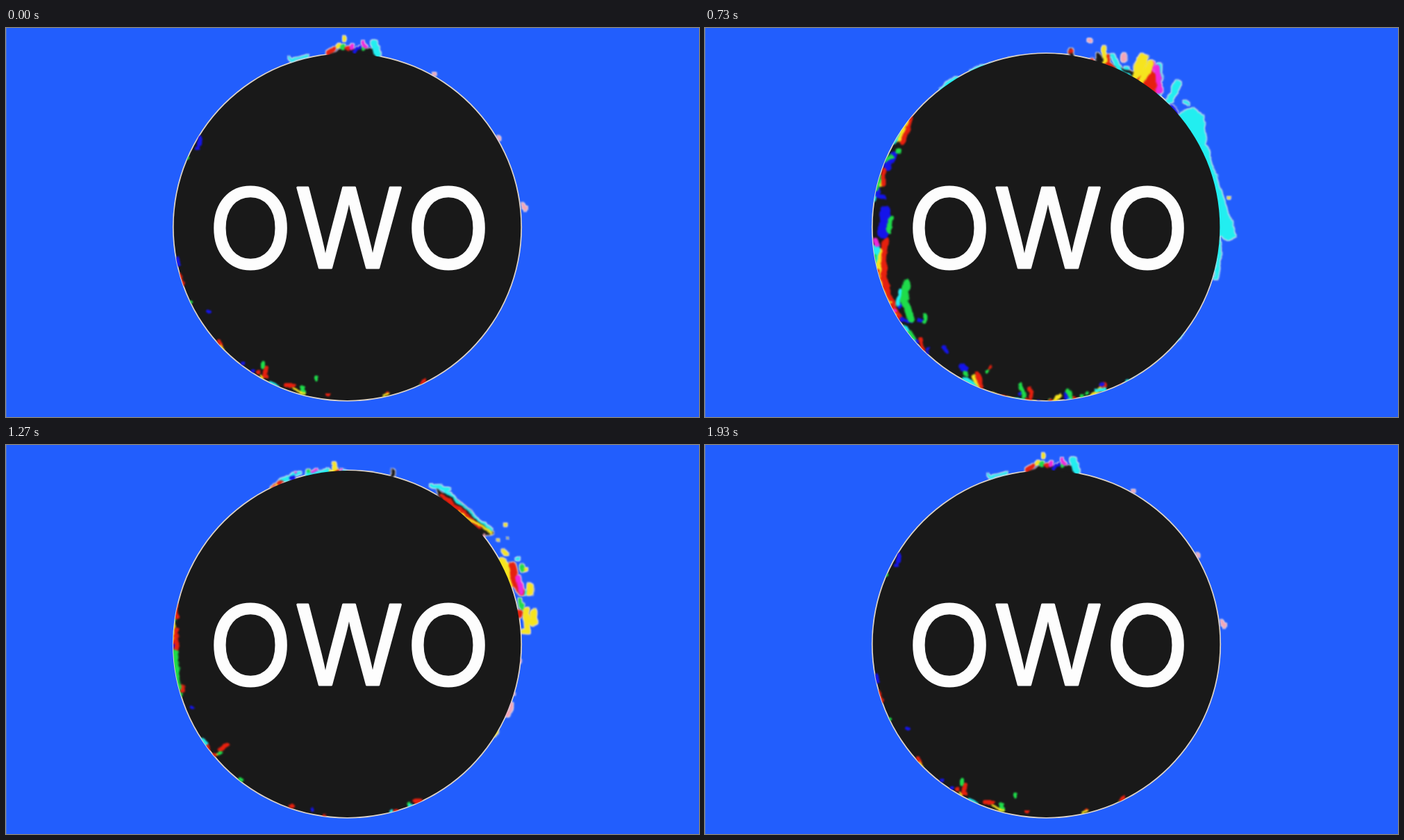
Write an HTML page without scripts that moves like this. It is 998 by 561 pixels and loops after 1.99 s.

```html
<!DOCTYPE html>
<html lang="en">
<head>
<meta charset="utf-8">
<title>OWO</title>
<style>
html, body { margin: 0; width: 100%; height: 100%; overflow: hidden; background: #225efd; }
svg { display: block; width: 100vw; height: 100vh; }
text { font: 159px Inter, "Open Sans", sans-serif; text-anchor: middle; fill: #fdfdfd; stroke: #fdfdfd; stroke-width: 3; stroke-linejoin: round; }
path { fill: none; stroke: currentColor; stroke-width: 6; stroke-linecap: round; stroke-linejoin: round; }
.solid { fill: currentColor; stroke-width: 2; }
.thin { stroke-width: 3.5; }
.mid { stroke-width: 10; }
.fat { stroke-width: 15; }
.c { color: #22eef0; } .y { color: #f6e41e; } .r { color: #e6200e; } .m { color: #ee28dc; }
.g { color: #1fdc4a; } .b { color: #1414ea; } .k { color: #191919; } .p { color: #f5a2b4; }

/* Flares sink under the disc, inner marks slide out past its edge. */
.outer { --s: .95; }
.inner { --s: 1.05; }
.outer g, .inner g { transform-origin: 491.5px 287px; animation: 1.99s infinite; }
.outer .p0, .inner .p0 { animation-name: p0; }
.outer .p1, .inner .p1 { animation-name: p1; }
.outer .p2, .inner .p2 { animation-name: p2; }
.outer .p3, .inner .p3 { animation-name: p3; }
.outer .p4, .inner .p4 { animation-name: p4; }
.outer .p5, .inner .p5 { animation-name: p5; }
@keyframes p0 {
  0% { visibility: visible; transform: rotate(0deg) scale(1); animation-timing-function: steps(4); }
  13.333% { visibility: hidden; transform: rotate(9deg) scale(var(--s)); animation-timing-function: step-end; }
  80% { visibility: hidden; transform: rotate(-9deg) scale(var(--s)); animation-timing-function: steps(5); }
  96.667%, 100% { visibility: visible; transform: rotate(0deg) scale(1); }
}
@keyframes p1 {
  0% { visibility: hidden; transform: rotate(-9deg) scale(var(--s)); animation-timing-function: steps(4); }
  13.333% { visibility: visible; transform: rotate(0deg) scale(1); animation-timing-function: steps(5); }
  30%, 100% { visibility: hidden; transform: rotate(9deg) scale(var(--s)); }
}
@keyframes p2 {
  0%, 13.333% { visibility: hidden; transform: rotate(-9deg) scale(var(--s)); animation-timing-function: steps(5); }
  30% { visibility: visible; transform: rotate(0deg) scale(1); animation-timing-function: steps(4); }
  43.333%, 100% { visibility: hidden; transform: rotate(9deg) scale(var(--s)); }
}
@keyframes p3 {
  0%, 30% { visibility: hidden; transform: rotate(-9deg) scale(var(--s)); animation-timing-function: steps(4); }
  43.333% { visibility: visible; transform: rotate(0deg) scale(1); animation-timing-function: steps(4); }
  56.667%, 100% { visibility: hidden; transform: rotate(9deg) scale(var(--s)); }
}
@keyframes p4 {
  0%, 43.333% { visibility: hidden; transform: rotate(-9deg) scale(var(--s)); animation-timing-function: steps(4); }
  56.667% { visibility: visible; transform: rotate(0deg) scale(1); animation-timing-function: steps(7); }
  80%, 100% { visibility: hidden; transform: rotate(9deg) scale(var(--s)); }
}
@keyframes p5 {
  0%, 56.667% { visibility: hidden; transform: rotate(-9deg) scale(var(--s)); animation-timing-function: steps(7); }
  80% { visibility: visible; transform: rotate(0deg) scale(1); animation-timing-function: steps(5); }
  96.667%, 100% { visibility: hidden; transform: rotate(9deg) scale(var(--s)); }
}
</style>
</head>
<body>
<svg viewBox="0 0 998 561">
<defs>
  <clipPath id="disc"><circle cx="491.5" cy="287" r="250.6"/></clipPath>
  <filter id="soft"><feGaussianBlur stdDeviation=".6"/></filter>
  <filter id="flare" filterUnits="userSpaceOnUse" x="0" y="0" width="998" height="561" color-interpolation-filters="sRGB">
    <feTurbulence type="fractalNoise" baseFrequency=".08" numOctaves="2" seed="4"/>
    <feDisplacementMap in="SourceGraphic" scale="7" xChannelSelector="R" yChannelSelector="G"/>
    <feGaussianBlur stdDeviation=".8" result="shape"/>
    <feMorphology operator="dilate" radius="1" result="wide"/>
    <feFlood flood-color="#dcd8ea"/>
    <feComposite in2="wide" operator="in"/>
    <feMerge><feMergeNode/><feMergeNode in="shape"/></feMerge>
  </filter>
  <filter id="smear" filterUnits="userSpaceOnUse" x="0" y="0" width="998" height="561" color-interpolation-filters="sRGB">
    <feTurbulence type="fractalNoise" baseFrequency=".09" numOctaves="2" seed="9"/>
    <feDisplacementMap in="SourceGraphic" scale="7" xChannelSelector="R" yChannelSelector="G"/>
    <feGaussianBlur stdDeviation="1.2"/>
  </filter>
</defs>

<rect width="998" height="561" fill="#225efd"/>
<rect width="1" height="561" fill="#4a74d6"/>
<circle cx="491.5" cy="287" r="251.6" fill="#ded4c8" filter="url(#soft)"/>

<g class="outer" filter="url(#flare)">
  <g class="p0">
    <path class="k solid" d="M455 44 470 37 495 29 525 31 540 44z"/>
    <path class="y" d="M487 14v2M478 29l3-3"/>
    <path class="r" d="M464 36l8-5M492 29h0"/>
    <path class="g" d="M486 30v-4M516 31h0"/>
    <path class="b" d="M502 33l3-3M510 29h0"/>
    <path class="m" d="M497 27l2-1M514 20l4 7"/>
    <path class="c mid" d="M530 21l4 16"/>
    <path class="c thin" d="M407 42l4 5 24-6"/>
    <path class="p thin" d="M743 254l4 8M746 260h5M614 66h3M708 158l2 3"/>
  </g>
  <g class="p1">
    <path class="k solid" d="M488 42 505 28 530 22 575 28 586 54z"/>
    <path class="k" d="M488 24v3"/>
    <path class="y" d="M499 15l11 17M538 22l4-8M560 26l4-15"/>
    <path class="r" d="M506 13l13 19M552 26l2-10M566 28l3-16"/>
    <path class="b" d="M513 16l10 14M573 44v-32"/>
    <path class="m" d="M545 16l3-3M568 30l2-12"/>
    <path class="g" d="M531 19v8"/>
    <path class="c" d="M522 20l5 6M580 48v-38"/>
    <path class="y thin" d="M415 43l25-5M467 32h2M742 250v25"/>
    <path class="c thin" d="M625 70l8 2M650 75h0M699 142l5 6M737 210l2 14M743 212l1 10"/>
  </g>
  <g class="p2">
    <path class="k solid" d="M545 42 547 25 560 38 600 48 634 70 642 88 590 74z"/>
    <path class="p" d="M533 8h0M586 25v6"/>
    <path class="r" d="M562 41l18 5"/>
    <path class="c" d="M590 43h4"/>
    <path class="c thin" d="M680 118l6 5M702 428l-5 8"/>
    <path class="y fat" d="M614 28l-7 28"/>
    <path class="r mid" d="M610 62l12-12"/>
    <path class="m mid" d="M628 34l-6 32"/>
    <path class="b" d="M624 70l9-20M632 80l-1-14"/>
    <path class="c mid" d="M639 38l1 42"/>
    <path class="y thin" d="M757 223h1M418 43l25-5"/>
    <path class="c thin" d="M728 180h0M735 191h0M738 207h0"/>
    <path class="p thin" d="M725 382v3"/>
  </g>
  <g class="p3">
    <path class="k" d="M548 30v8"/>
    <path class="r" d="M548 32h1M603 42l-3 14M576 48h2"/>
    <path class="y" d="M597 29v22"/>
    <path class="c" d="M609 42l11 26 16 12M743 325q2 30-8 57"/>
    <path class="y mid" d="M664 58l-18 30"/>
    <path class="m mid" d="M673 66v34"/>
    <path class="r solid" d="M664 70 648 94 668 106 669 76z"/>
    <path class="c mid" d="M701 91l-13 23M355 73l21-13"/>
    <path class="b" d="M690 124l6 10"/>
    <path class="c thin" d="M711 117l4 5M400 48l30-8"/>
    <path class="c solid" d="M697 137 722 130 733 140 736 180 748 240 762 290 769 322 758 327 742 318 738 240z"/>
    <path class="y thin" d="M715 405l-9 13"/>
  </g>
  <g class="p4">
    <path class="c" d="M386 52l23-12M430 41l22-6M605 49l22 5"/>
    <path class="m thin" d="M404 40h0M429 37l7-3"/>
    <path class="r" d="M373 63l12-8"/>
    <path class="b" d="M398 48h4"/>
    <path class="y thin" d="M372 64l6-4M455 36h10M716 405l-4 6"/>
    <path class="k" d="M546 31v8"/>
    <path class="k solid" d="M612 55 640 68 697 115 680 120 620 75z"/>
    <path class="c thin" d="M625 57l35 29 34 25"/>
    <path class="r" d="M619 63l58 44"/>
    <path class="y thin" d="M645 87l50 28"/>
    <path class="y" d="M714 102h0M713 140l4 4M746 166h1M748 256h8"/>
    <path class="y thin" d="M705 125h0M718 122h0"/>
    <path class="y fat" d="M713 158l15 28"/>
    <path class="r mid" d="M727 162l6 24 9 14M740 230v4"/>
    <path class="m" d="M737 178l4 22"/>
    <path class="c" d="M734 152h1M749 198v4"/>
    <path class="g" d="M742 162v4M741 212l2 10"/>
    <path class="y mid" d="M755 190v10M750 226l4 28M762 228v14"/>
    <path class="p thin" d="M744 298v4M735 364l-5 18M738 349h0"/>
  </g>
  <g class="p5">
    <path class="c mid" d="M463 27l-3 9M515 33h2"/>
    <path class="g" d="M463 24h0M452 37h0"/>
    <path class="y" d="M502 17v18"/>
    <path class="r" d="M505 30h0"/>
    <path class="m thin" d="M512 28h0M406 47l5-5M659 98l6 6"/>
    <path class="y thin" d="M425 42l20-5M546 40h1"/>
    <path class="c thin" d="M480 34h9M682 118l2 3M641 487l3-2"/>
    <path class="p thin" d="M713 147l-4 4M738 355v3M727 383l-3 4"/>
  </g>
</g>

<circle cx="491.5" cy="287" r="249.9" fill="#191919" filter="url(#soft)"/>

<g clip-path="url(#disc)">
<g class="inner" filter="url(#smear)">
  <g class="p0">
    <path class="b" d="M279 158l-1 9M276 172h0M247 333l2 8M291 408h0M340 484h0M356 495h0"/>
    <path class="g" d="M262 188h0M265 395h0M370 483v6M428 520v6M447 505h0M597 514h0"/>
    <path class="r" d="M251 357l3 12M306 452l4 6M375 490l-2 13M364 496h0M404 516h12M463 530h0M549 527h0M598 512l6-3"/>
    <path class="y thin" d="M308 458l4 4M367 502l3 4M414 521l15 6M544 531l7-3"/>
    <path class="c thin" d="M380 511l12 5"/>
  </g>
  <g class="p1">
    <path class="r" d="M247 240l-2 20M243 284l1 16M316 454l19 14M346 472l14 5M448 520h0M468 525h0M487 521l3 12M660 470h0"/>
    <path class="y" d="M243 255v18M312 459l20 16M395 498l5-21M482 527l4 7M635 487l8-6"/>
    <path class="g" d="M258 238h0M247 312h0M260 344h0M326 473l18 9M389 502l6-23M439 512l3 12"/>
    <path class="c" d="M334 480l22 7M379 505l4-20M431 529h4M445 531l20 3M612 504l10-7"/>
    <path class="m" d="M363 492l13 10M476 532h0"/>
    <path class="b" d="M384 503l7-24M432 510l3 14"/>
  </g>
  <g class="p2">
    <path class="r mid" d="M289 142l-9 40M268 325q-8 60 28 106M590 503l-6 14"/>
    <path class="y mid" d="M281 154l-8 26M260 340q-6 56 30 92"/>
    <path class="y" d="M249 230l5 16M406 504l8 16M420 526l55 9M529 521l-6 10M575 520l10-12"/>
    <path class="c mid" d="M268 182l3-10M245 268l2-24M255 336l-1 26M302 446l14 14M396 511l12 9M488 537h6"/>
    <path class="b mid" d="M262 220l8-18M389 492l5 4"/>
    <path class="b fat" d="M264 282l-1 32"/>
    <path class="b" d="M252 262v-8M325 432h0M362 468l4 4M338 470h0M500 534h0M322 462h0"/>
    <path class="g" d="M276 194v4M260 212l6-7M253 236l-4 18M272 292v18M331 425v7M312 450l6 8M395 502h0M425 495h0M515 530h0M560 521h0"/>
    <path class="r" d="M257 224l2 20M411 500l8 19M428 490h0M538 521l14 5M440 529l12 2M484 533h10"/>
    <path class="m" d="M253 326l4 4M462 534h0"/>
  </g>
  <g class="p3">
    <path class="b" d="M262 226l6 2M278 381h0M274 400l18 5M310 451h0M436 518h0M500 522l2 10M553 514h0"/>
    <path class="g mid" d="M290 350l-6 25 9 27"/>
    <path class="g" d="M247 308v12M284 421h0M438 505l4 18M455 530h0M503 519l4 13M530 525h0M610 505h4M400 518h0"/>
    <path class="r" d="M263 182h0M250 330v14M262 362l8 18M276 394l-4 8M303 431l2 19M450 512l2 18M478 531h0M573 523l6-5"/>
    <path class="c" d="M243 315h0M280 362l-5 16M275 411l19 28M430 525l10 4M505 533h0M544 522h11M590 514l20-8"/>
    <path class="y thin" d="M265 375h0M298 442h0M565 525h0M625 496l10-6"/>
    <path class="m" d="M270 386h0"/>
  </g>
  <g class="p4">
    <path class="r mid" d="M247 298l2 4M600 506h4"/>
    <path class="r" d="M300 446h0M328 437l-10 8M470 534h0M572 522h0"/>
    <path class="g" d="M245 263h0M250 309h0M250 350h0M318 450h0M348 487h0M590 512h0"/>
    <path class="c" d="M245 318h2M290 432l7 7M480 537h3M566 523h0M592 515h2"/>
    <path class="b" d="M248 335h0M275 387h0M452 524h0"/>
    <path class="y thin" d="M243 306h0M314 452h0M605 510h0"/>
    <path class="m thin" d="M245 292h0"/>
  </g>
  <g class="p5">
    <path class="r" d="M261 194l-1 30M258 240l-4 15M256 320v6M281 408h0M290 420h0M326 473h0M390 503h0"/>
    <path class="y mid" d="M254 204l-6 50"/>
    <path class="g mid" d="M250 270v54"/>
    <path class="c" d="M243 266v52M286 425h0M338 482l8 7M640 487l-8 6"/>
    <path class="g" d="M254 332h0M276 404h0M295 440h0"/>
    <path class="b" d="M250 262h0M270 396h0M249 338h0"/>
    <path class="y thin" d="M280 413h0M243 240h0"/>
  </g>
</g>
</g>

<text x="352 494 637" y="345.5">OWO</text>
</svg>
</body>
</html>
```
